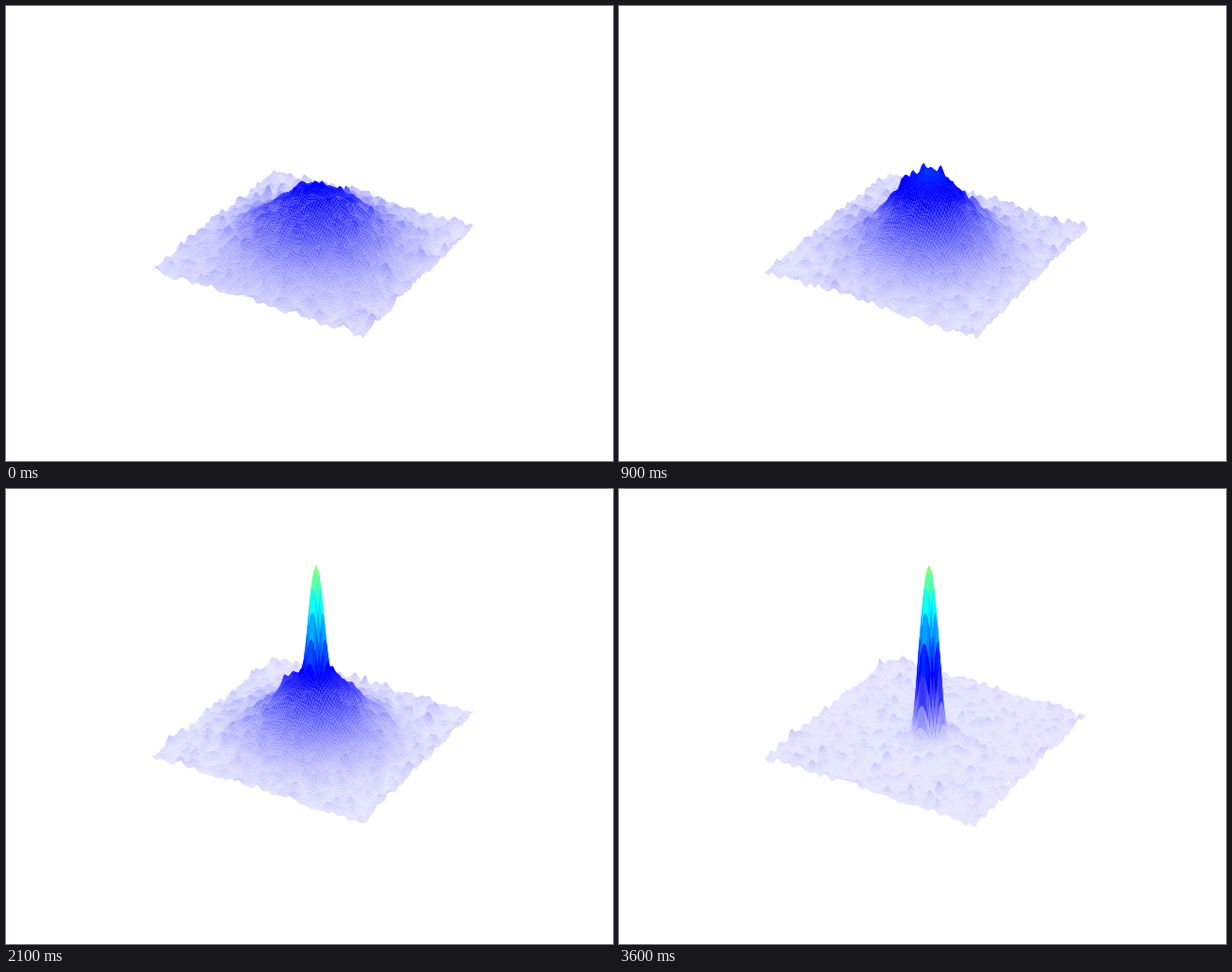
Animation of 640 by 480 pixels, one loop 4.5 s. Source, as a matplotlib script:

```python
import numpy as np
import matplotlib.pyplot as plt
from matplotlib.animation import FuncAnimation
from matplotlib.collections import PolyCollection

W, H, DPI = 640, 480, 100
STATES, FRAMES, STEP = 13, 15, 300      # the last state is held
N, HALF, BASE = 101, 0.628, -0.15       # grid size, half width, floor level
CX, CY, ZOOM, DIST = 327, 234, 1998, 10

# Thermal cloud height and width, then total peak height once condensed
CLOUD = [.36, .44, .50, .47, .48, .50, .48, .42, .35, .27, .19, .12, .06]
WIDTH = [.26, .24, .22, .208, .205, .2, .195, .185, .17, .15, .125, .1, .08]
PEAK = [0, 0, 0, 0, 0, 0, .55, 1.0, 1.016, 1.016, .965, 1.144, 1.0]
RADIUS = [.05] * 6 + [.06, .078, .085, .092, .098, .1, .102]

# Height to colour: pale lavender, blue, cyan, yellow, red
LEVELS = [0, .38, .42, .78, 1.14, 1.5]
RED = [.89, 0, 0, 0, 1, 1]
GREEN = [.89, 0, 0, 1, 1, 0]
BLUE = [.995, .985, 1, 1, 0, 0]
HOLE = -.026

axis = np.linspace(-HALF, HALF, N)
X, Y = np.meshgrid(axis, axis, indexing="ij")
R2 = X**2 + Y**2

elev, azim = np.radians([30, -60])
RIGHT = np.array([-np.sin(azim), np.cos(azim), 0])
TOWARD = np.array([np.cos(elev) * np.cos(azim),
                   np.cos(elev) * np.sin(azim), np.sin(elev)])
UP = np.cross(TOWARD, RIGHT)


def noise(seed):
    """Smooth bumps with a few taller spikes."""
    g = np.random.default_rng(seed).normal(size=(N, N))
    k = np.fft.fftfreq(N) * 2 * np.pi
    blur = np.exp(-(k[:, None]**2 + k[None, :]**2) / 2)
    g = np.fft.ifft2(np.fft.fft2(g) * blur).real
    g /= g.std()
    return .012 * (g + .13 * (g**2 - 1))


def height(i):
    sharp = 1 - .02 * i                 # the cloud turns conical as it cools
    cloud = CLOUD[i] * np.exp(-(R2 / WIDTH[i]**2)**sharp / 2)
    haze = .025 * (1 - i / (STATES - 1))
    core = np.clip(1 - R2 / RADIUS[i]**2, 0, None)**2
    spike = max(PEAK[i] - CLOUD[i] - haze, 0) * core
    trough = .02 * np.exp(-((X - HALF + .055) / .012)**2)
    calm = 1 - core if PEAK[i] else 1
    return cloud + haze + spike + (noise(40 + i) - trough) * calm


def quads(a):
    return np.stack([a[:-1, :-1], a[1:, :-1], a[1:, 1:], a[:-1, 1:]],
                    axis=2).reshape(-1, 4, *a.shape[2:])


def surface(i):
    h = height(i)
    p = np.stack([X, Y, h + BASE], axis=-1)
    near = p @ TOWARD
    scale = ZOOM / (DIST - near)
    xy = np.stack([CX + p @ RIGHT * scale, CY - p @ UP * scale], axis=-1)
    level = quads(h).mean(axis=1)
    rgb = np.stack([np.interp(level, LEVELS, c)
                    for c in (RED, GREEN, BLUE)], axis=-1)
    rgb[level < HOLE] = 1
    order = np.argsort(quads(near).mean(axis=1))
    return quads(xy)[order], rgb[order]


fig = plt.figure(figsize=(W / DPI, H / DPI), dpi=DPI, facecolor="white")
ax = fig.add_axes([0, 0, 1, 1])
ax.set(xlim=(0, W), ylim=(H, 0))
ax.axis("off")
mesh = PolyCollection([], edgecolors="none", linewidths=0, antialiaseds=True)
ax.add_collection(mesh, autolim=False)


def update(frame):
    verts, rgb = surface(min(frame, STATES - 1))
    mesh.set_verts(verts)
    mesh.set_facecolor(rgb)
    return (mesh,)


anim = FuncAnimation(fig, update, frames=FRAMES, interval=STEP,
                     repeat=True, repeat_delay=0, blit=False)
plt.show()
```
